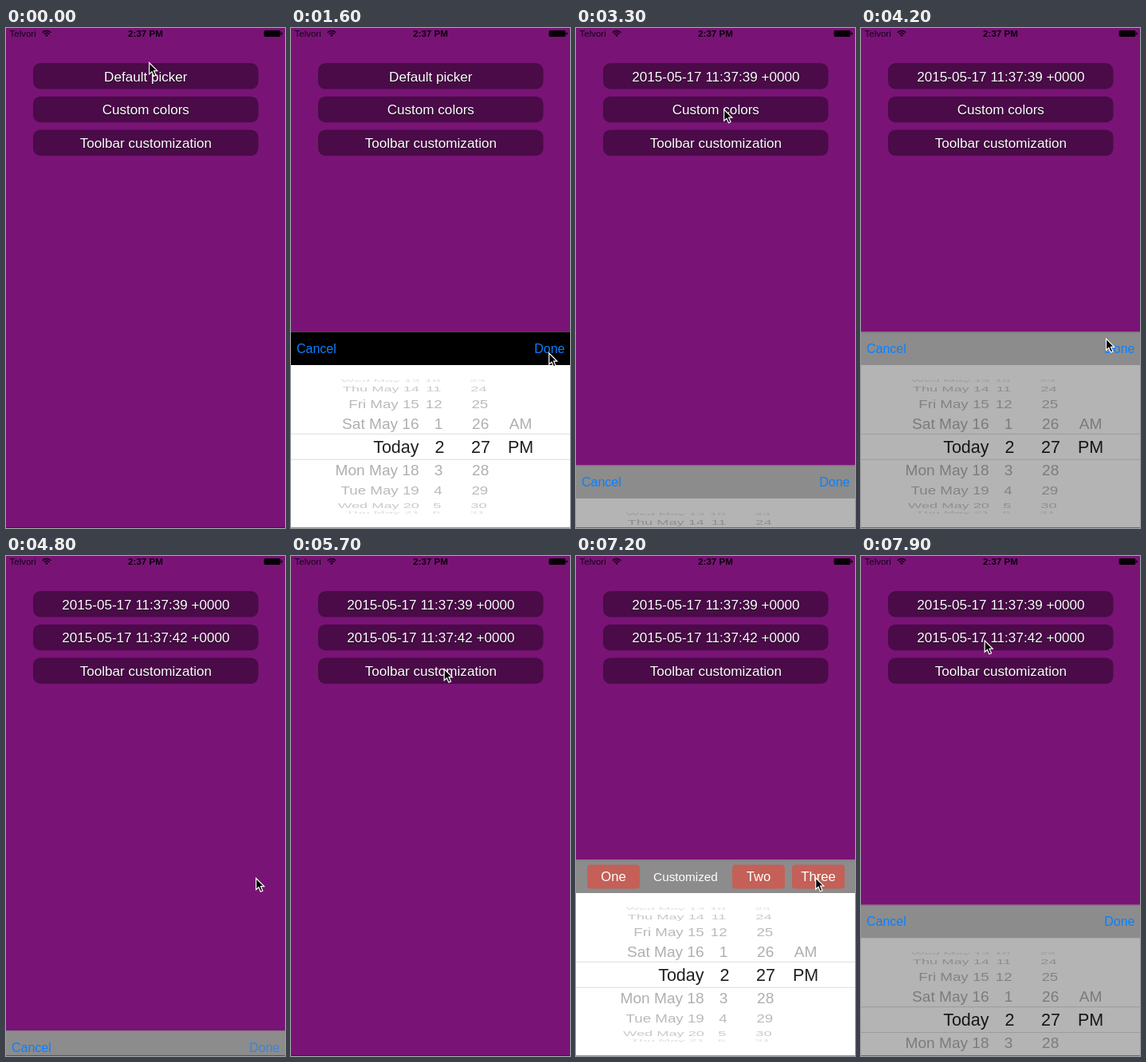
Recreate the animation shown at these times as an HTML page with a canvas. Size 350 by 626 pixels, loop 8000 ms.

```html
<!DOCTYPE html>
<html lang="en">
<head>
<meta charset="utf-8">
<title>Date picker demo</title>
<style>
  html, body { margin: 0; width: 100%; height: 100%; overflow: hidden; background: #791476; }
  canvas { display: block; width: 350px; height: 626px; }
</style>
</head>
<body>
<canvas id="stage" width="350" height="626"></canvas>
<script>
const W = 350, H = 626, LOOP = 8000, STEP = 100;
const PANEL = 245.5, BAR = 41.5;
const BLUE = '#0b80ff';
const ctx = document.getElementById('stage').getContext('2d');

const sheets = [
  { open: 350, close: 1850, bar: '#000', back: '#fff' },
  { open: 3237, close: 4605, bar: '#8c8c8c', back: '#b4b4b4' },
  { open: 5780, close: 7250, bar: '#8c8c8c', back: '#fff', custom: true },
  { open: 7746, close: 9999, bar: '#8c8c8c', back: '#b4b4b4' }
];

// time, x, y of the pointer tip
const path = [
  [0, 179, 42.5], [300, 180, 52], [600, 180, 52], [1400, 323, 406], [1850, 323, 406],
  [2300, 320, 396], [3100, 185, 101], [3600, 185, 101], [4300, 314, 405],
  [4800, 313, 402.5], [5600, 191.5, 140.5], [6200, 191.5, 140.5], [6800, 300, 402],
  [7250, 300, 402], [7700, 154.5, 105], [8000, 154.5, 105]
];

const days = ['Wed May 13', 'Thu May 14', 'Fri May 15', 'Sat May 16', 'Today',
  'Mon May 18', 'Tue May 19', 'Wed May 20', 'Thu May 21'];

function spring(ms) {
  if (ms <= 0) return 0;
  const u = ms * 0.01826;
  return 1 - (1 + u) * Math.exp(-u);
}

function text(str, x, y, size, color, align = 'center', weight = '') {
  ctx.font = `${weight} ${size}px "Liberation Sans", Arial, sans-serif`;
  ctx.textAlign = align;
  ctx.fillStyle = color;
  ctx.fillText(str, x, y);
}

function rect(x, y, w, h, color, r = 0) {
  ctx.fillStyle = color;
  ctx.beginPath();
  ctx.roundRect(x, y, w, h, r);
  ctx.fill();
}

function statusBar() {
  text('Telvori', 4.5, 11, 11.5, '#16031a', 'left');
  text('2:37 PM', 175, 11, 11.6, '#0c020c', 'center', 'bold');
  ctx.strokeStyle = '#0c020c';
  ctx.lineWidth = 1.5;
  for (const r of [4.2, 7]) {
    ctx.beginPath();
    ctx.arc(51, 10.5, r, -Math.PI * 0.77, -Math.PI * 0.23);
    ctx.stroke();
  }
  ctx.fillStyle = '#0c020c';
  ctx.beginPath();
  ctx.moveTo(51, 11);
  ctx.arc(51, 10.5, 2.3, -Math.PI * 0.77, -Math.PI * 0.23);
  ctx.fill();
  rect(323.5, 3, 21, 8, '#060106', 2);
  rect(345.3, 5.5, 1.5, 3, '#060106', 1);
}

function mainButton(label, row) {
  const y = 44 + row * 41.7;
  rect(34, y, 282.5, 32.5, '#4a0b48', 9);
  ctx.shadowColor = 'rgba(0,0,0,.8)';
  ctx.shadowOffsetY = 1;
  ctx.shadowBlur = 1;
  text(label, 175.3, y + 22.6, 17.1, '#fff');
  ctx.shadowColor = 'transparent';
}

function wheelText(str, x, y, size, sx, sy, color, align) {
  ctx.save();
  ctx.translate(x, y);
  ctx.scale(sx, sy);
  text(str, 0, size * 0.355, size, color, align);
  ctx.restore();
}

function wheels() {
  for (let k = -4; k <= 4; k++) {
    const angle = k * 20 * Math.PI / 180;
    const cos = Math.cos(angle), back = 1 - cos;
    const y = 144 + 84 * Math.sin(angle);
    const size = k ? 19.2 : 21.5;
    const color = k ? `rgba(0,0,0,${0.1 + 0.23 * cos})` : 'rgba(0,0,0,.88)';
    const put = (str, x, align) =>
      wheelText(str, x, y, size, 1 - 0.1 * back, cos, color, align);
    put(days[k + 4], 160.5 + back, 'right');
    put(String((k + 13) % 12 + 1), (k ? 190.5 : 192.5) - 4 * back, 'right');
    put(String(27 + k), 238 - 5 * back, 'center');
    if (k === -1) put('AM', 288, 'center');
    if (k === 0) put('PM', 288, 'center');
  }
  rect(0, 127.3, W, 1, 'rgba(0,0,0,.14)');
  rect(0, 159.3, W, 1, 'rgba(0,0,0,.14)');
}

function barButton(label, x) {
  rect(x, 6, 66, 30, '#c46057', 4);
  text(label, x + 33, 26.7, 16.6, '#fff');
}

function sheet(s, t) {
  const shown = spring(t - s.open) - spring(t - s.close);
  if (t < s.open || shown < 0.004) return;
  ctx.save();
  ctx.translate(0, H - PANEL * shown);
  rect(0, 0, W, PANEL + 1, s.back);
  rect(0, 0, W, BAR, s.bar);
  rect(0, 0, W, 1, 'rgba(0,0,0,.15)');
  if (s.custom) {
    barButton('One', 14);
    text('Customized', 137.5, 26, 15.3, '#fff');
    barButton('Two', 196);
    barButton('Three', 271);
  } else {
    text('Cancel', 7, 26.6, 16, BLUE, 'left');
    // "Done" dims while pressed, then recovers
    const since = t - s.close;
    ctx.globalAlpha = since < -80 ? 1 : Math.min(1, 0.3 + Math.max(0, since) / 600);
    text('Done', 343.5, 26.6, 16, BLUE, 'right');
    ctx.globalAlpha = 1;
  }
  wheels();
  ctx.restore();
}

function pointer(t) {
  const i = path.findIndex((p, n) => n && t <= p[0]);
  const [t0, x0, y0] = path[i - 1], [t1, x1, y1] = path[i];
  const u = (t - t0) / (t1 - t0), e = u * u * (3 - 2 * u);
  ctx.save();
  ctx.translate(x0 + (x1 - x0) * e, y0 + (y1 - y0) * e);
  const arrow = new Path2D('M.7 1V15.2L4 12.2 6.4 17.8 9 16.7 6.6 11.2H10.8Z');
  ctx.fillStyle = '#000';
  ctx.strokeStyle = '#fff';
  ctx.lineWidth = 1.2;
  ctx.fill(arrow);
  ctx.stroke(arrow);
  ctx.restore();
}

function draw(t) {
  rect(0, 0, W, H, '#791476');
  statusBar();
  mainButton(t < sheets[0].close ? 'Default picker' : '2015-05-17 11:37:39 +0000', 0);
  mainButton(t < sheets[1].close ? 'Custom colors' : '2015-05-17 11:37:42 +0000', 1);
  mainButton('Toolbar customization', 2);
  sheets.forEach(s => sheet(s, t));
  rect(0, 625, W, 1, 'rgba(0,0,0,.4)');
  pointer(t);
}

const start = performance.now();
function tick() {
  const t = (performance.now() - start) % LOOP;
  draw(Math.floor(t / STEP) * STEP);
  requestAnimationFrame(tick);
}
tick();
</script>
</body>
</html>
```
